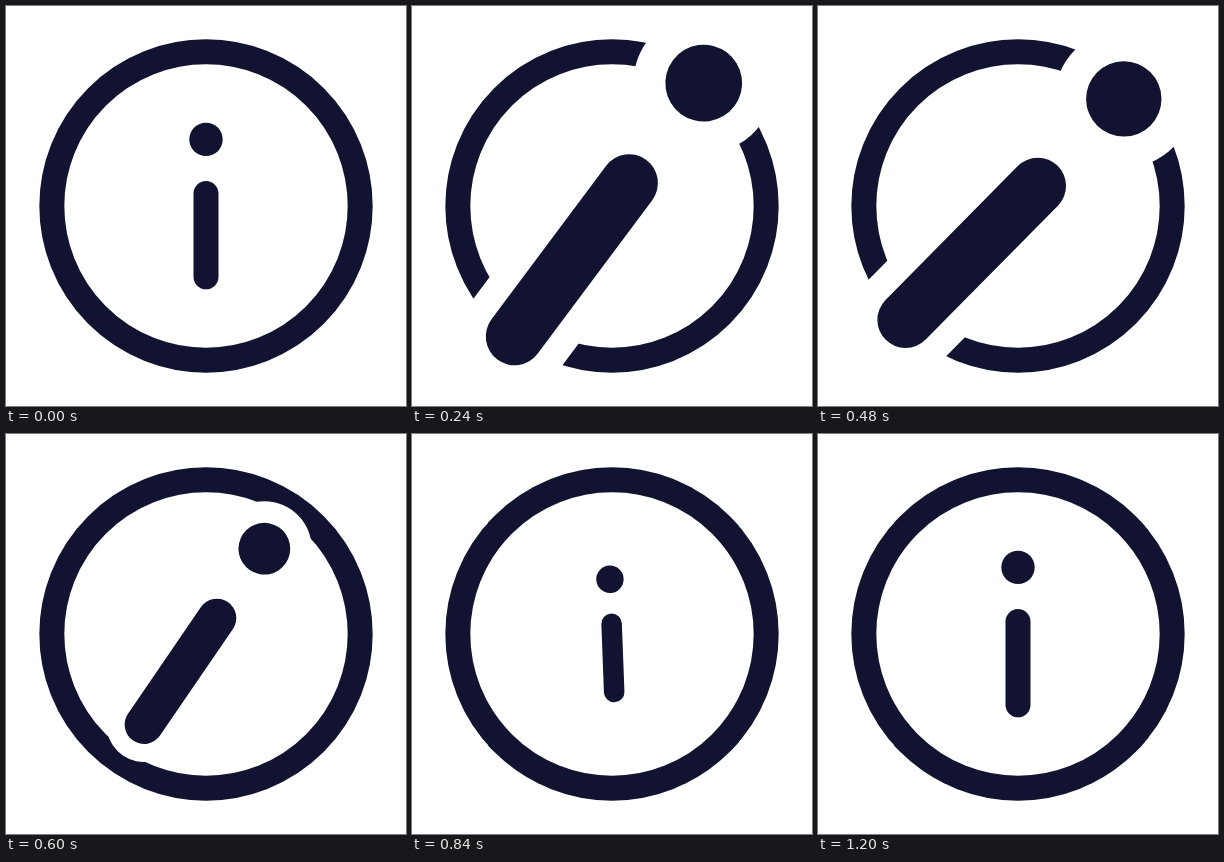
These frames come from a looping animation (400x400 px, 3.23 s). An HTML page:

```html
<!DOCTYPE html>
<html lang="en">
<head>
<meta charset="utf-8">
<title>Info icon</title>
<style>
  html, body { margin: 0; width: 100%; height: 100%; overflow: hidden; background: #fff; }
  svg { display: block; width: 100%; height: 100%; }
</style>
</head>
<body>
<svg viewBox="-200 -200 400 400" fill="none" stroke="#121331" stroke-linecap="round">
  <circle r="154.17" stroke-width="25"/>
  <g id="letter">
    <g stroke="#fff">
      <path d="M0-66.67h0" stroke-width="61.2"/>
      <path d="M0-12.5V70.83" stroke-width="48.3"/>
    </g>
    <path d="M0-66.67h0" stroke-width="33.4"/>
    <path d="M0-12.5V70.83" stroke-width="25"/>
  </g>
</svg>
<script>
  const LOOP = 3230, STEP = 30, LAST = 40;
  const letter = document.getElementById('letter');

  // Keys are [step, value]; each span eases in and out.
  const scaleKeys = [[0, 1], [8, 2.3], [15, 2.3], [25, 0.8], [LAST, 1]];
  const angleKeys = [[0.3, 0], [10.9, 45], [15.2, 45], [32.6, -12], [LAST, 0]];

  function valueAt(keys, n) {
    if (n <= keys[0][0]) return keys[0][1];
    for (let i = 1; i < keys.length; i++) {
      const [n0, v0] = keys[i - 1], [n1, v1] = keys[i];
      if (n <= n1) {
        const k = (n - n0) / (n1 - n0);
        return v0 + (v1 - v0) * k * k * (3 - 2 * k);
      }
    }
    return keys[keys.length - 1][1];
  }

  function draw(now) {
    const n = Math.min(LAST, Math.floor((now % LOOP) / STEP));
    const angle = valueAt(angleKeys, n), scale = valueAt(scaleKeys, n);
    letter.setAttribute('transform', `rotate(${angle}) scale(${scale})`);
  }

  let start;
  function tick(now) {
    start ??= now;
    draw(now - start);
    requestAnimationFrame(tick);
  }
  draw(0);
  requestAnimationFrame(tick);
</script>
</body>
</html>
```
